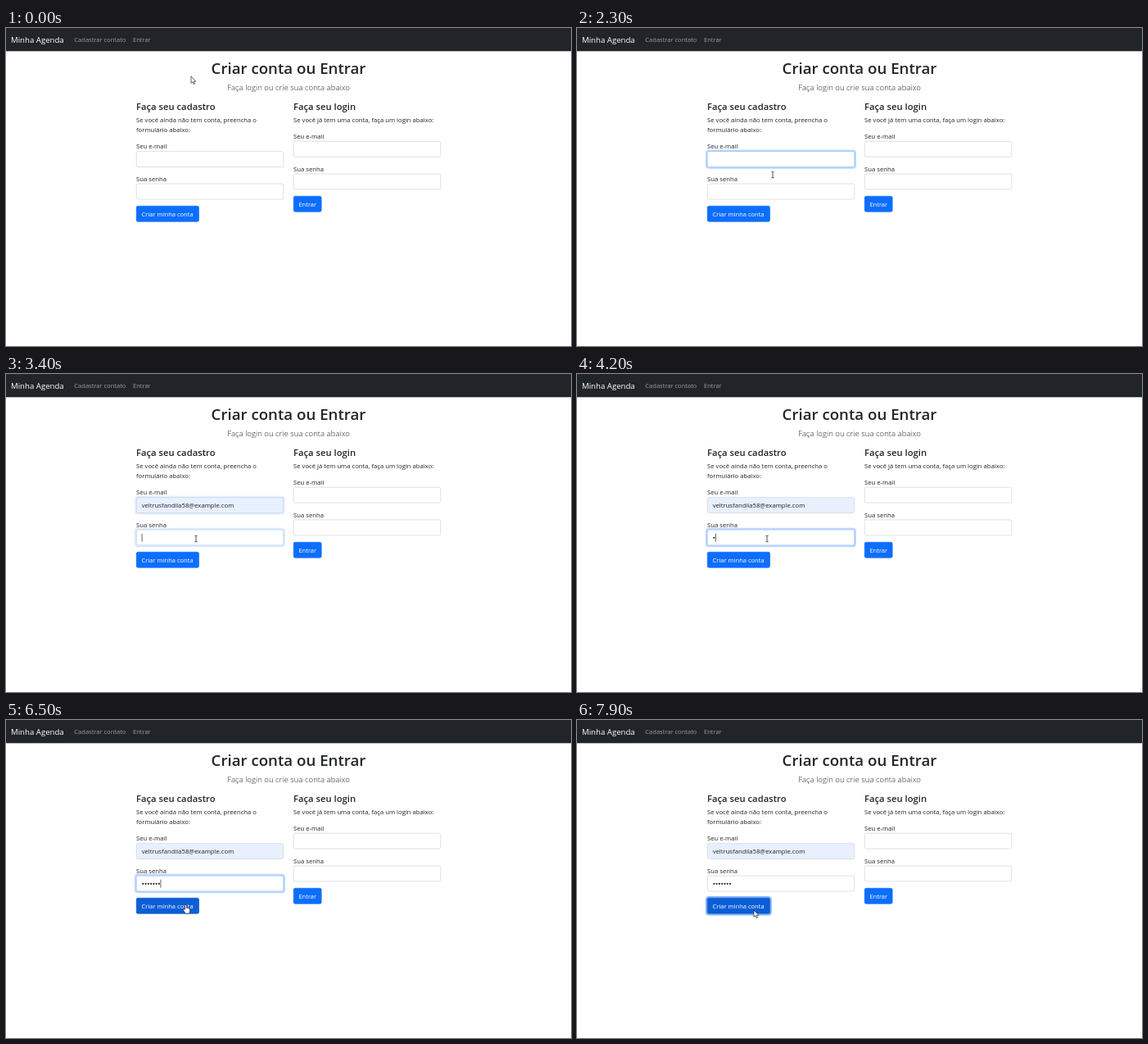
These frames come from a looping animation (690x388 px, 8 s). An HTML page:

```html
<!DOCTYPE html>
<html lang="pt-BR">
<head>
<meta charset="utf-8">
<title>Minha Agenda</title>
<style>
  html, body { margin: 0; width: 100%; height: 100%; overflow: hidden; background: #fff; }
  svg { display: block; width: 690px; height: 388px; font: 7.7px "Open Sans", "Noto Sans", sans-serif; fill: #212529; }
  .title { font-size: 18.7px; font-weight: 600; }
  .heading { font-size: 11.25px; font-weight: 600; }
  .lead { font-size: 9.6px; font-weight: 300; }
  .brand { font-size: 9.65px; fill: #fff; }
  .link { font-size: 7.55px; fill: #9b9d9f; }
  .button { font-size: 7.55px; fill: #fff; }
  .mouse { stroke: #222; stroke-width: .7; stroke-linejoin: round; fill: #fff; }
</style>
</head>
<body>
<svg viewBox="0 0 690 388">
  <rect width="690" height="28.3"/>
  <text class="brand" x="6" y="18">Minha Agenda</text>
  <text class="link" x="83.3" y="17.2">Cadastrar contato</text>
  <text class="link" x="155" y="17.2">Entrar</text>

  <text class="title" x="345" y="56" text-anchor="middle">Criar conta ou Entrar</text>
  <text class="lead" x="345" y="76.2" text-anchor="middle">Faça login ou crie sua conta abaixo</text>

  <text class="heading" x="159" y="100">Faça seu cadastro</text>
  <text x="159" y="115.2">Se você ainda não tem conta, preencha o</text>
  <text x="159" y="127.2">formulário abaixo:</text>
  <text x="159" y="147.4">Seu e-mail</text>
  <text x="159" y="187">Sua senha</text>

  <text class="heading" x="351" y="100">Faça seu login</text>
  <text x="351" y="115.2">Se você já tem uma conta, faça um login abaixo:</text>
  <text x="351" y="135.2">Seu e-mail</text>
  <text x="351" y="174.8">Sua senha</text>

  <g id="boxes"></g>
  <text id="emailText" x="165.7" y="163">veltrusfandila58@example.com</text>
  <g id="dots"></g>
  <rect id="caret" y="194.7" width=".7" height="10"/>
  <text class="button" x="165.6" y="229.6">Criar minha conta</text>
  <text class="button" x="357.4" y="217.6">Entrar</text>

  <g id="cursor">
    <path id="arrow" class="mouse" d="M0 0V8.4L1.9 6.7 3.2 9.5 4.5 8.9 3.2 6.2H5.8Z"/>
    <path id="beam" d="M-1.6-3.7H-.5L0-3.3.5-3.7H1.6M0-3.3V3.3M-1.6 3.7H-.5L0 3.3.5 3.7H1.6" fill="none" stroke="#222" stroke-width=".8"/>
    <path id="hand" class="mouse" d="M-.9 5.8V1Q-.9 0 0 0T.9 1V4Q1.8 3.3 2.5 4.3 3.5 3.7 4 4.7 5.2 4.3 5.2 5.7V7.8Q5 9 4.2 10.8H-.2Q-1 9-3 6.8-3.2 5.2-2 5.3Z"/>
  </g>
</svg>
<script>
const DURATION = 8000;
const PASSWORD_X = 165.7, DOT_STEP = 3.27;
const keyTimes = [4200, 4500, 5100, 5200, 5250, 5300, 5400];
const path = [ // time, x, y
  [0, 226, 59], [500, 243, 120], [1500, 243, 120], [1750, 243, 160],
  [1950, 243, 160], [2300, 239, 179], [2900, 239, 179], [3250, 232, 201],
  [6150, 232, 201], [6650, 216, 232], [DURATION, 216, 232]
];

const $ = id => document.getElementById(id);
const clamp = v => Math.max(0, Math.min(1, v));
const show = (id, on) => $(id).setAttribute('visibility', on ? 'visible' : 'hidden');

function add(parent, tag, attrs) {
  const el = document.createElementNS('http://www.w3.org/2000/svg', tag);
  for (const name in attrs) el.setAttribute(name, attrs[name]);
  return $(parent).appendChild(el);
}

function box(x, y, w, h, fill, border) {
  const ring = add('boxes', 'rect', {
    x: x - 1, y: y - 1, width: w + 2, height: h + 2, rx: 3,
    fill: 'none', stroke: '#0d6efd', 'stroke-width': 2, opacity: 0
  });
  const body = add('boxes', 'rect', {
    x: x + .25, y: y + .25, width: w - .5, height: h - .5, rx: 2,
    fill, stroke: border, 'stroke-width': .7
  });
  return { ring, body };
}
const field = (x, y) => box(x, y, 180, 19.4, '#fff', '#ced4da');
const button = (x, y, w) => box(x, y, w, 19.4, '#0d6efd', '#0d6efd');

const email = field(159, 150.4), password = field(159, 189.8);
field(351, 138);
field(351, 177.7);
const signUp = button(159, 217, 76.8);
button(351, 205, 34.4);
const dots = keyTimes.map((_, i) =>
  add('dots', 'circle', { cx: PASSWORD_X + DOT_STEP * (i + .5), cy: 199.8, r: 1.1 }));

// Focus amount between two moments, with a 150 ms transition.
const focus = (t, start, end) => clamp((t - start) / 150) - clamp((t - end) / 150);

function mix(from, to, amount) {
  return `rgb(${from.map((v, i) => v + (to[i] - v) * amount)})`;
}

function setFieldFocus({ ring, body }, amount) {
  ring.setAttribute('opacity', .27 * amount);
  body.setAttribute('stroke', mix([206, 212, 218], [134, 183, 254], amount));
}

function cursorAt(t) {
  const i = path.findIndex(p => p[0] > t);
  const [t0, x0, y0] = path[i - 1], [t1, x1, y1] = path[i];
  const p = (t - t0) / (t1 - t0), e = p * p * (3 - 2 * p);
  return [x0 + (x1 - x0) * e, y0 + (y1 - y0) * e];
}

function caretVisible(t) {
  if (t < 3330 || t >= 6750) return false;
  const since = t < 4200 ? 3400 : keyTimes.filter(k => k <= t).pop();
  const age = Math.max(0, t - since);
  return since === 5400 ? age < 400 || age >= 900 : age % 1000 < 500;
}

function render(t) {
  setFieldFocus(email, focus(t, 1800, 3300));
  setFieldFocus(password, focus(t, 3330, 6740));

  const filled = t >= 2900;
  email.body.setAttribute('fill', filled ? '#e8f0fe' : '#fff');
  show('emailText', filled);

  const typed = keyTimes.filter(k => k <= t).length;
  dots.forEach((dot, i) => dot.setAttribute('visibility', i < typed ? 'visible' : 'hidden'));
  $('caret').setAttribute('x', PASSWORD_X + typed * DOT_STEP);
  show('caret', caretVisible(t));

  const [x, y] = cursorAt(t);
  const hover = y > 217;
  const beam = y > 150 && y < 209;
  const hand = hover && t < 6900;
  $('cursor').setAttribute('transform', `translate(${x} ${y})`);
  show('beam', beam);
  show('hand', hand);
  show('arrow', !beam && !hand);

  signUp.body.setAttribute('fill', hover ? '#0b5ed7' : '#0d6efd');
  signUp.body.setAttribute('stroke', hover ? '#0a58ca' : '#0d6efd');
  signUp.ring.setAttribute('opacity', .5 * focus(t, 6800, DURATION));
}

function frame() {
  render(performance.now() % DURATION);
  requestAnimationFrame(frame);
}
frame();
</script>
</body>
</html>
```
